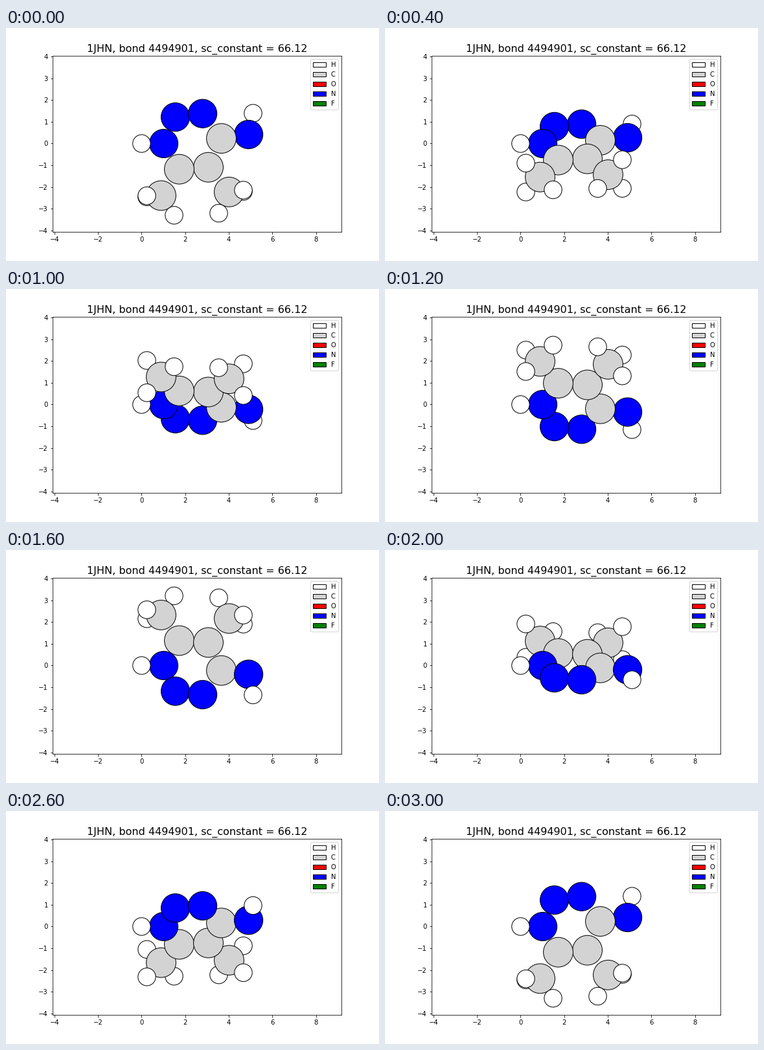
Animation of 576 by 360 pixels, one loop 3200 ms. Source, as a matplotlib script:

```python
import numpy as np
import matplotlib.pyplot as plt
from matplotlib.animation import FuncAnimation
from matplotlib.patches import Patch

FRAMES = 16
COLORS = {"H": "white", "C": "lightgray", "O": "red", "N": "blue", "F": "green"}
RADII = {"H": 25, "C": 70, "O": 60, "N": 65, "F": 50}  # pm

# element, x, y, z; the H-N bond lies on the x axis
ATOMS = [
    ("N", 1.015, 0, 0),
    ("H", 0, 0, 0),
    ("N", 1.55, 1.215, -0.05),
    ("N", 2.8, 1.375, -0.04),
    ("N", 4.91, 0.415, -0.015),
    ("C", 3.66, 0.235, -0.01),
    ("C", 1.727, -1.18, 0.04),
    ("C", 3.065, -1.09, 0.035),
    ("C", 0.895, -2.39, 0.08),
    ("C", 4.015, -2.225, 0.08),
    ("H", 5.115, 1.39, -0.045),
    ("H", 0.24, -2.4, 0.95),
    ("H", 0.24, -2.45, -0.79),
    ("H", 1.49, -3.295, 0.105),
    ("H", 3.54, -3.2, 0.105),
    ("H", 4.67, -2.14, 0.925),
    ("H", 4.67, -2.2, -0.79),
]
elements = [a[0] for a in ATOMS]
x, y, z = np.array([a[1:] for a in ATOMS], dtype=float).T
sizes = np.array([30 * RADII[e] for e in elements])
colors = np.array([COLORS[e] for e in elements])

fig, ax = plt.subplots(figsize=(8, 5), dpi=72, facecolor="white")
fig.subplots_adjust(left=0.125, right=0.9, bottom=0.125, top=0.88)
ax.set_xlim(-4.085, 9.185)
ax.set_ylim(-4.058, 4.022)
ax.set_xticks(range(-4, 9, 2))
ax.set_yticks(range(-4, 5))
ax.set_title("1JHN, bond 4494901, sc_constant = 66.12", fontsize=16)
ax.legend(
    handles=[Patch(facecolor=c, edgecolor="black", label=e) for e, c in COLORS.items()],
    loc="upper right",
)
balls = ax.scatter(x, y, s=sizes, c=colors, edgecolors="black", linewidths=1)


def update(i):
    """Turn the molecule about the x axis and paint it back to front."""
    angle = 2 * np.pi * i / (FRAMES - 1)
    height = y * np.cos(angle) + z * np.sin(angle)
    depth = z * np.cos(angle) - y * np.sin(angle)
    order = np.argsort(depth, kind="stable")
    balls.set_offsets(np.column_stack([x, height])[order])
    balls.set_sizes(sizes[order], dpi=fig.dpi)
    balls.set_facecolor(colors[order])
    return (balls,)


anim = FuncAnimation(
    fig, update, frames=FRAMES, interval=200, repeat=True, repeat_delay=0
)
plt.show()
```
